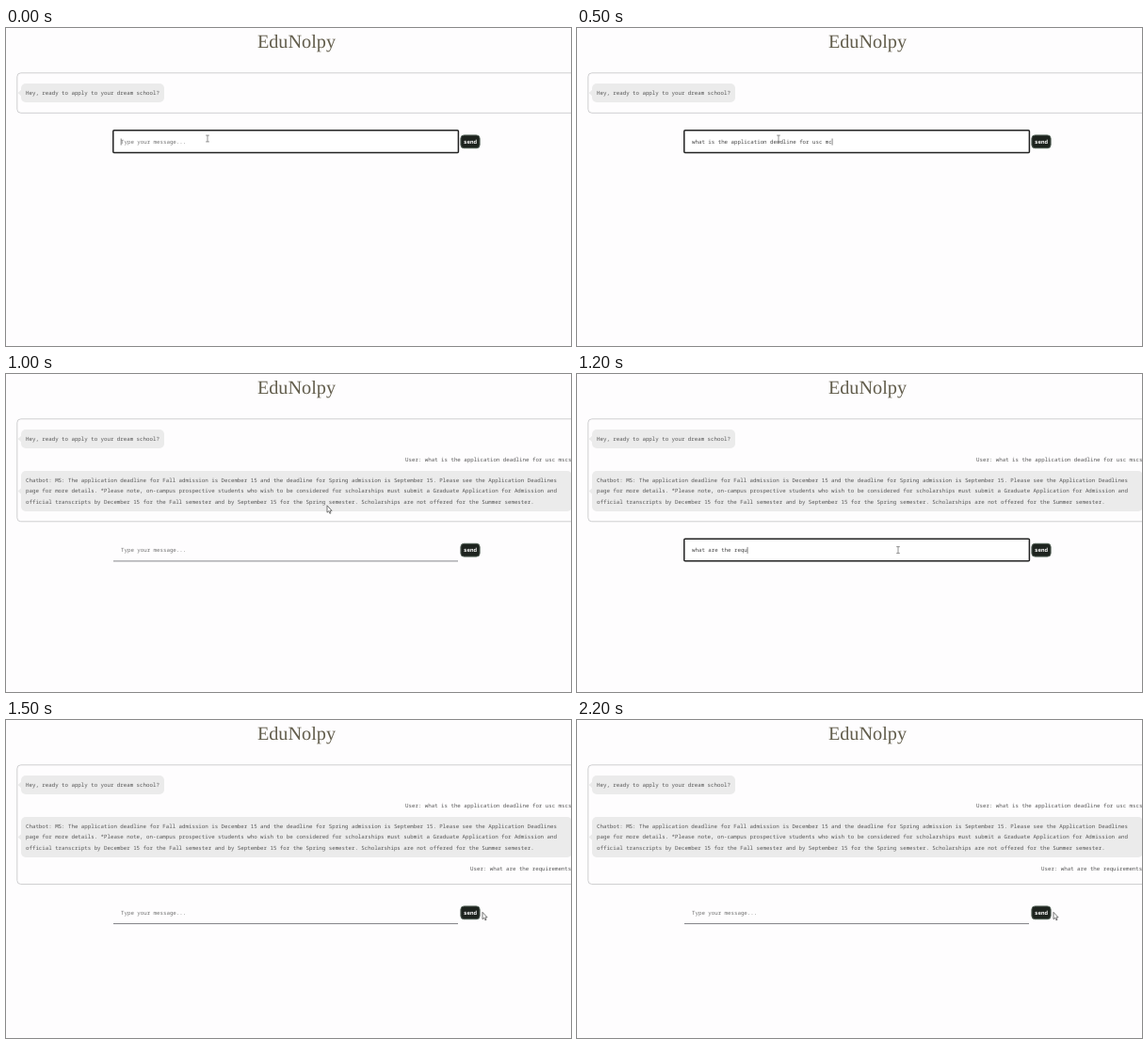
Write an HTML page that moves like this. It is 600 px wide and 338 px high and loops after 2500 ms.

```html
<!DOCTYPE html>
<html lang="en">
<head>
<meta charset="utf-8">
<title>Chat</title>
<style>
  html, body { margin: 0; width: 100%; height: 100%; overflow: hidden; background: #fefdfe; }
  svg { display: block; width: 100vw; height: 100vh; }
  text {
    font: 5.77px "Noto Sans Mono", "DejaVu Sans Mono", monospace;
    fill: #555; white-space: pre; text-rendering: geometricPrecision;
  }
  .title { font: 20.25px "Liberation Serif", "Times New Roman", serif; fill: #625d4c; text-anchor: middle; }
  .bubble { fill: #ebebeb; }
  #panel { fill: none; stroke: #cfcfd1; }
  #ring { fill: #fff; stroke: #222; stroke-width: 1.5; }
  #line { stroke: #85858a; }
  .button { fill: #1d231e; stroke: #56645a; }
  .send { fill: #fff; font-weight: 600; }
  #caret { stroke: #333; stroke-width: .6; }
  #beam { fill: none; stroke: #777; stroke-width: .8; }
  #arrow { fill: #fff; stroke: #555; stroke-width: .8; stroke-linejoin: round; }
</style>
</head>
<body>
<svg viewBox="0 0 600 338">
  <text class="title" x="308.5" y="21">EduNolpy</text>
  <rect id="panel" x="11.8" y="47.8" width="640" height="43" rx="4"/>

  <path class="bubble" d="M17 65 L12.5 69 L17 73Z"/>
  <rect class="bubble" x="16" y="59" width="152" height="20" rx="5"/>
  <text x="21" y="71">Hey, ready to apply to your dream school?</text>

  <text id="ask1" x="424" y="93.2">User: what is the application deadline for usc mscs</text>

  <g id="reply">
    <path class="bubble" d="M17 120.5 L12.5 124.5 L17 128.5Z"/>
    <rect class="bubble" x="16" y="103" width="585" height="43" rx="5"/>
    <text x="21" y="115.2">Chatbot: MS: The application deadline for Fall admission is December 15 and the deadline for Spring admission is September 15. Please see the Application Deadlines</text>
    <text x="21" y="126.4">page for more details. *Please note, on-campus prospective students who wish to be considered for scholarships must submit a Graduate Application for Admission and</text>
    <text x="21" y="137.6">official transcripts by December 15 for the Fall semester and by September 15 for the Spring semester. Scholarships are not offered for the Summer semester.</text>
  </g>

  <text id="ask2" x="493" y="159.8">User: what are the requirements</text>

  <g id="form">
    <rect id="ring" x="113.8" y="108.8" width="366.6" height="23.6" rx="1"/>
    <path id="line" d="M114 132.5H480"/>
    <text id="field" x="122" y="123"></text>
    <path id="caret" d="M0 117.5V124.5"/>
    <rect class="button" x="482.9" y="113.9" width="20.2" height="13.8" rx="3.5"/>
    <text class="send" x="486.1" y="122.9">send</text>
  </g>

  <path id="beam" d="M-1.8 -3.4H1.8M0 -3.4V3.4M-1.8 3.4H1.8"/>
  <path id="arrow" d="M0 0V7.4L1.7 5.9L2.9 8.5L4 8L2.9 5.5H5.1Z"/>
</svg>
<script>
  const LOOP = 2500, STEP = 100, CHAR = 5.77 * 0.6;
  const HINT = "Type your message...";
  const Q1 = "what is the application deadline for usc mc";
  const Q2 = "what are the requirements";

  // Chat stages: panel bottom and form offset
  const stages = [
    { bottom: 90.3, shift: 0 },
    { bottom: 107.5, shift: 17.6 },
    { bottom: 156.8, shift: 66.4 },
    { bottom: 174.5, shift: 84 }
  ];

  // [start, stage, focused, text, letters typed by the end, pointer, x, y]
  const scenes = [
    [0, 0, true, Q1, 0, "beam", 214, 117.5],
    [100, 0, true, Q1, 9, "beam", 214, 117.5],
    [200, 0, true, Q1, 17, "beam", 214, 117.5],
    [300, 0, true, Q1, 26, "beam", 214, 117.5],
    [400, 0, true, Q1, 34, "beam", 214, 117.5],
    [500, 0, true, Q1, 43, "beam", 214, 117.5],
    [600, 1, false, "", 0, "arrow", 491.5, 136],
    [700, 1, false, "", 0, "beam", 342, 140.5],
    [1000, 2, false, "", 0, "arrow", 341, 139.8],
    [1100, 2, true, Q2, 8, "beam", 341, 187],
    [1200, 2, true, Q2, 17, "beam", 341, 187],
    [1300, 2, true, Q2, 25, "beam", 430, 190],
    [1400, 2, false, Q2, 25, "arrow", 497.5, 192.3],
    [1500, 3, false, "", 0, "arrow", 506, 204.3]
  ];

  const el = id => document.getElementById(id);
  const show = (id, on) => el(id).style.display = on ? "" : "none";
  const move = (id, x, y) => el(id).setAttribute("transform", `translate(${x} ${y})`);

  function draw(t) {
    const [, stage, focus, text, count, pointer, x, y] = scenes.findLast(s => s[0] <= t);
    const { bottom, shift } = stages[stage];
    const typed = text.slice(0, count);

    el("panel").setAttribute("height", bottom - 47.8);
    show("ask1", stage >= 1);
    show("reply", stage >= 2);
    show("ask2", stage >= 3);

    move("form", 0, shift);
    show("ring", focus);
    show("line", !focus);
    show("caret", focus);
    move("caret", 122.2 + count * CHAR, 0);
    el("field").textContent = typed || HINT;
    el("field").style.fill = typed ? "#444" : "#707070";

    for (const id of ["beam", "arrow"]) show(id, id === pointer);
    move(pointer, x, y);
  }

  const start = performance.now();
  let last = -1;
  function tick() {
    const t = Math.floor((performance.now() - start) % LOOP / STEP) * STEP;
    if (t !== last) draw(last = t);
    requestAnimationFrame(tick);
  }
  tick();
</script>
</body>
</html>
```
